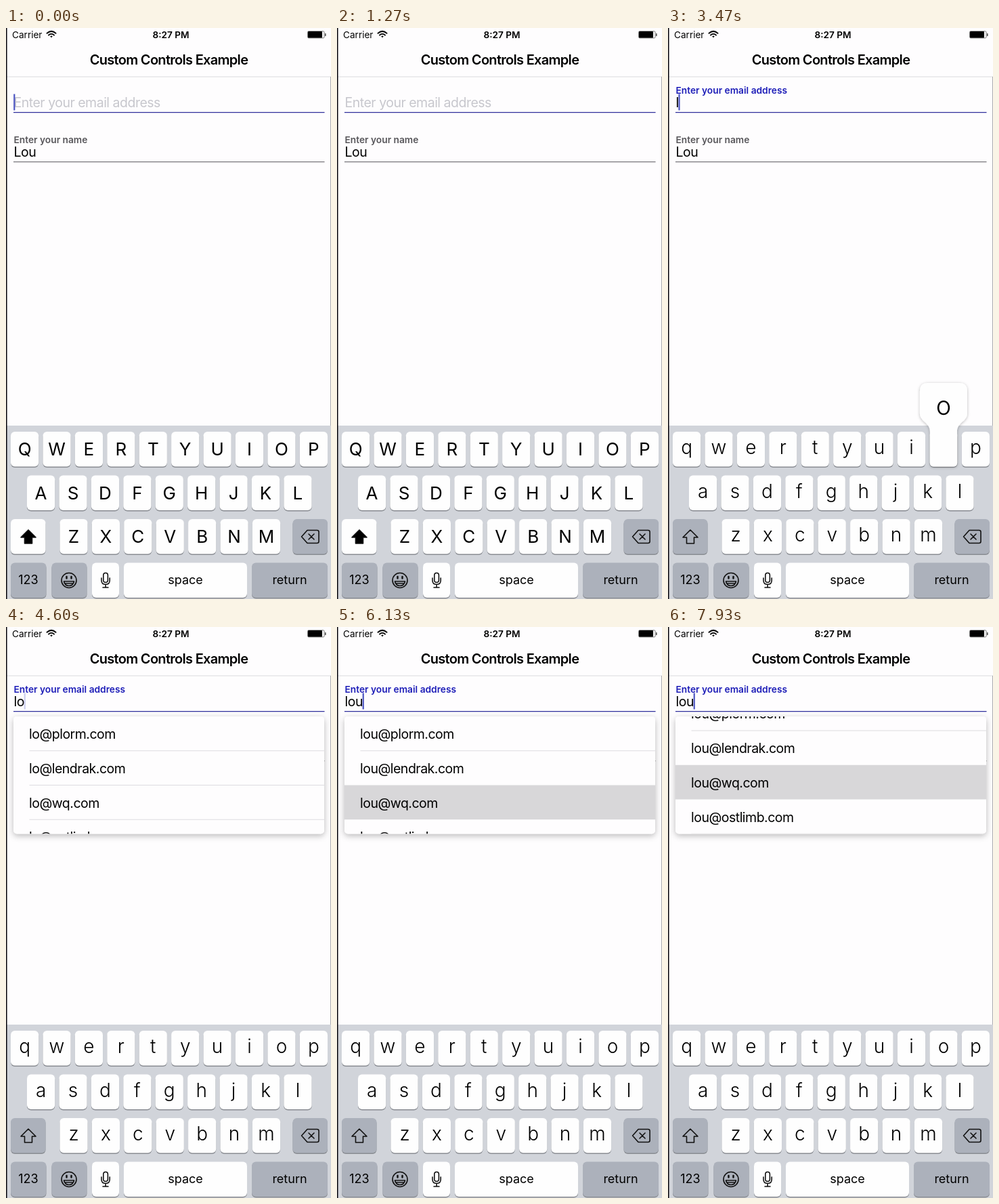
Animation of 480x843 px, one loop 8 s. Source, as an HTML page:

```html
<!DOCTYPE html>
<html lang="en">
<head>
<meta charset="utf-8">
<title>Custom Controls Example</title>
<style>
html, body { margin: 0; width: 100%; height: 100%; overflow: hidden; background: #fefdfe; }
svg { display: block; width: 100%; height: 100%; }
text { font-family: Inter, Roboto, sans-serif; white-space: pre; }
.field { font-size: 19.5px; letter-spacing: -.5px; }
.label { font-size: 13.75px; font-weight: 600; }
.title { font-size: 20px; font-weight: 600; letter-spacing: -.7px; }
.status { font-size: 13.6px; }
.key { font-size: 26px; }
.key.low { font-size: 28px; font-weight: 300; }
.big { font-size: 38px; font-weight: 300; }
.word { font-size: 18px; }
.mid { text-anchor: middle; }
.icon { fill: none; stroke: #111; stroke-width: 1.6; stroke-linejoin: round; stroke-linecap: round; }
</style>
</head>
<body>
<svg viewBox="0 0 480 843" preserveAspectRatio="none">
  <defs>
    <clipPath id="panelClip"><rect x="11" y="132" width="459" height="173.3" rx="5"/></clipPath>
    <filter id="soft" x="-20%" y="-20%" width="140%" height="150%">
      <feDropShadow dx="0" dy="3" stdDeviation="5" flood-opacity=".27"/>
    </filter>
    <filter id="lift" x="-20%" y="-20%" width="140%" height="140%">
      <feDropShadow dx="0" dy="1" stdDeviation="2" flood-opacity=".28"/>
    </filter>
  </defs>

  <rect width="480" height="843" fill="#fefdfe"/>
  <path d="M0 72H480" stroke="#dcdbdf" stroke-width="1.2"/>
  <text class="status" x="9" y="15">Carrier</text>
  <g class="icon" stroke-width="2" stroke-linecap="butt">
    <path d="M60.5 7.8Q67 2 73.500 7.800M63 10.500Q67 7 71 10.500" stroke-width="2"/>
    <path d="M65.200 12.300Q67 10.800 68.800 12.300L67 14.200Z" fill="#000" stroke="none"/>
  </g>
  <text class="status mid" x="243.500" y="15" font-weight="600">8:27 PM</text>
  <rect x="445.500" y="4.800" width="24.500" height="10" rx="1.500" fill="none" stroke="#555" stroke-width=".8"/>
  <rect x="446" y="5" width="21" height="9.600" rx="1"/>
  <path d="M471.800 8v4" stroke="#333" stroke-width="1.300"/>
  <text class="title mid" x="240.500" y="53.500">Custom Controls Example</text>

  <text class="label" x="11.500" y="169.500" fill="#58575b">Enter your name</text>
  <text class="field" x="11.500" y="190">Lou</text>
  <path d="M11 197.600H470.500" stroke="#77767b" stroke-width="1.300"/>

  <text id="caption" x="11.500">Enter your email address</text>
  <text id="typed" class="field" x="11.500" y="117"></text>
  <rect id="caret" y="97.500" width="2.200" height="24" fill="#4c55c2"/>
  <path d="M11 124.600H470.500" stroke="#30309c" stroke-width="1.400"/>

  <g id="panel">
    <rect x="11" y="132" width="459" height="173.300" rx="5" fill="#fefdfe" filter="url(#soft)"/>
    <g clip-path="url(#panelClip)"><g id="rows"></g></g>
  </g>

  <rect y="587" width="480" height="256" fill="#d1d4da"/>
  <g id="keys"></g>
  <g id="popup">
    <path filter="url(#lift)" fill="#fefefe" d="M-35 -60Q-35 -72 -23 -72H23Q35 -72 35 -60V-27C35 -15 20 -14 20 0V46Q20 51.500 14.500 51.500H-14.500Q-20 51.500 -20 46V0C-20 -14 -35 -15 -35 -27Z"/>
    <text id="popupLetter" class="big mid" y="-25"></text>
  </g>
  <rect width="1.600" height="843" fill="#15141a"/>
  <path d="M479.600 72V587" stroke="#8a898e" stroke-width=".8"/>
</svg>
<script>
const LOOP = 8000, PITCH = 50.75, PANEL_TOP = 132, MAX_SCROLL = 29.75;
const DOMAINS = ['plorm.com', 'lendrak.com', 'wq.com', 'ostlimb.com'];
const LIGHT = '#fefefe', DARK = '#acb1bb';
const PRESSES = [
  { from: 2870, to: 3000, key: 'l' },
  { from: 3470, to: 3590, key: 'o' },
  { from: 4730, to: 4870, key: 'u' }
];
const $ = id => document.getElementById(id);
const set = (el, attrs) => { for (const k in attrs) el.setAttribute(k, attrs[k]); };
const ramp = (t, from, to) => Math.min(1, Math.max(0, (t - from) / (to - from)));
const easeOut = u => 1 - (1 - u) ** 3;
const mix = (a, b, u) => a + (b - a) * u;

// Keyboard
const cap = (x, y, w, fill, id = '') =>
  `<rect x="${x}" y="${y + 1.5}" width="${w}" height="51.5" rx="6" fill="#898c92"/>
   <rect ${id} x="${x}" y="${y}" width="${w}" height="51.5" rx="6" fill="${fill}"/>`;
const word = (x, s) => `<text class="word mid" x="${x}" y="821">${s}</text>`;
const keyAt = {};
let html = '';
[['qwertyuiop', 7, 596], ['asdfghjkl', 31, 660.5], ['zxcvbnm', 79.4, 725]].forEach(([row, x0, y]) => {
  [...row].forEach((letter, i) => {
    const x = x0 + 47.42 * i, cx = x + 20.6;
    keyAt[letter] = { x: cx, y };
    html += cap(x, y, 41.2, LIGHT) + `<text class="key mid" x="${cx}" data-y="${y}">${letter}</text>`;
  });
});
html += cap(7, 725, 51.5, DARK, 'id="shift"') + cap(423.5, 725, 51.5, DARK)
  + cap(7, 789.5, 52.5, DARK) + cap(67.5, 789.5, 52, DARK) + cap(127, 789.5, 40, LIGHT)
  + cap(174, 789.5, 182, LIGHT) + cap(363, 789.5, 112, DARK)
  + word(33, '123') + word(265, 'space') + word(419, 'return')
  + `<g class="icon">
      <path id="arrow" d="M33 741L44 752H38.5V761H27.5V752H22Z"/>
      <path d="M445 741.500H459.500Q462 741.500 462 744V758Q462 760.500 459.500 760.500H445L436.500 751ZM447 747L455 755M455 747L447 755"/>
      <circle cx="93" cy="815.500" r="11"/>
      <path d="M85.500 817H100.500Q99 823.500 93 823.500Q87 823.500 85.500 817ZM87 820H99"/>
      <path d="M89.500 810V812.500M96.500 810V812.500" stroke-width="2.500"/>
      <rect x="143.800" y="804.500" width="6.600" height="14" rx="3.300"/>
      <path d="M141 812V815.500Q141 821.500 147.100 821.500Q153.200 821.500 153.200 815.500V812M147.100 821.500V826M143 826H151"/>
    </g>`;
$('keys').innerHTML = html;
const letters = [...document.querySelectorAll('.key')];

function setCase(upper) {
  for (const el of letters) {
    const s = el.textContent;
    el.textContent = upper ? s.toUpperCase() : s.toLowerCase();
    el.classList.toggle('low', !upper);
    el.setAttribute('y', +el.dataset.y + (upper ? 35.3 : 33.2));
  }
  set($('shift'), { fill: upper ? LIGHT : DARK });
  set($('arrow'), { fill: upper ? '#000' : 'none' });
}

// Suggestion rows
$('rows').innerHTML = `<rect id="mark" x="11" y="${PANEL_TOP + 2 * PITCH}" width="459" height="${PITCH}" fill="#d8d7d9"/>`
  + DOMAINS.map((d, i) => `<text class="field" x="34" y="${PANEL_TOP + 33 + i * PITCH}"></text>`
  + `<path class="rule" d="M34.500 ${PANEL_TOP + (i + 1) * PITCH}H470" stroke="#dddce0" stroke-width="1.200"/>`).join('');
const rowTexts = [...$('rows').querySelectorAll('text')];
const rules = [...$('rows').querySelectorAll('.rule')];

function caretAlpha(t, anchor) {
  const q = t - anchor - 510;
  if (q < 0) return 1;
  const p = q % 960;
  return p < 480 ? (1 - ramp(p, 0, 150)) ** 3 : easeOut(ramp(p, 480, 680));
}

let wasUpper;
function draw() {
  const t = performance.now() % LOOP;

  const upper = t < 1470;
  if (upper !== wasUpper) setCase(wasUpper = upper);

  const done = PRESSES.filter(p => t >= p.to);
  const typed = done.map(p => p.key).join('');
  const anchor = done.length ? done[done.length - 1].to : -345;
  $('typed').textContent = typed;
  const width = typed ? $('typed').getComputedTextLength() : 0;
  set($('caret'), { x: 11.2 + width, opacity: caretAlpha(t, anchor) });

  const float = easeOut(ramp(t, 3000, 3300));
  const rgb = [[199, 30], [199, 30], [205, 184]].map(([a, b]) => Math.round(mix(a, b, float)));
  set($('caption'), {
    y: mix(117, 96.5, float),
    fill: `rgb(${rgb})`,
    'font-size': mix(19.5, 13.75, float),
    'font-weight': float > 0 ? 600 : 400,
    'letter-spacing': mix(-.5, 0, float)
  });

  set($('panel'), { opacity: ramp(t, 3580, 3730) });
  rowTexts.forEach((el, i) => el.textContent = typed + '@' + DOMAINS[i]);
  const marked = t >= 6130 && t < 6330 || t >= 7730;
  set($('mark'), { opacity: marked ? 1 : 0 });
  rules.forEach((el, i) => set(el, { opacity: marked && (i === 1 || i === 2) ? 0 : 1 }));
  set($('rows'), { transform: `translate(0 ${-MAX_SCROLL * easeOut(ramp(t, 6270, 6730))})` });

  const press = PRESSES.find(p => t >= p.from && t < p.to);
  set($('popup'), { visibility: press ? 'visible' : 'hidden' });
  if (press) {
    const { x, y } = keyAt[press.key];
    set($('popup'), { transform: `translate(${x} ${y})` });
    $('popupLetter').textContent = press.key;
  }
  requestAnimationFrame(draw);
}
draw();
</script>
</body>
</html>
```
